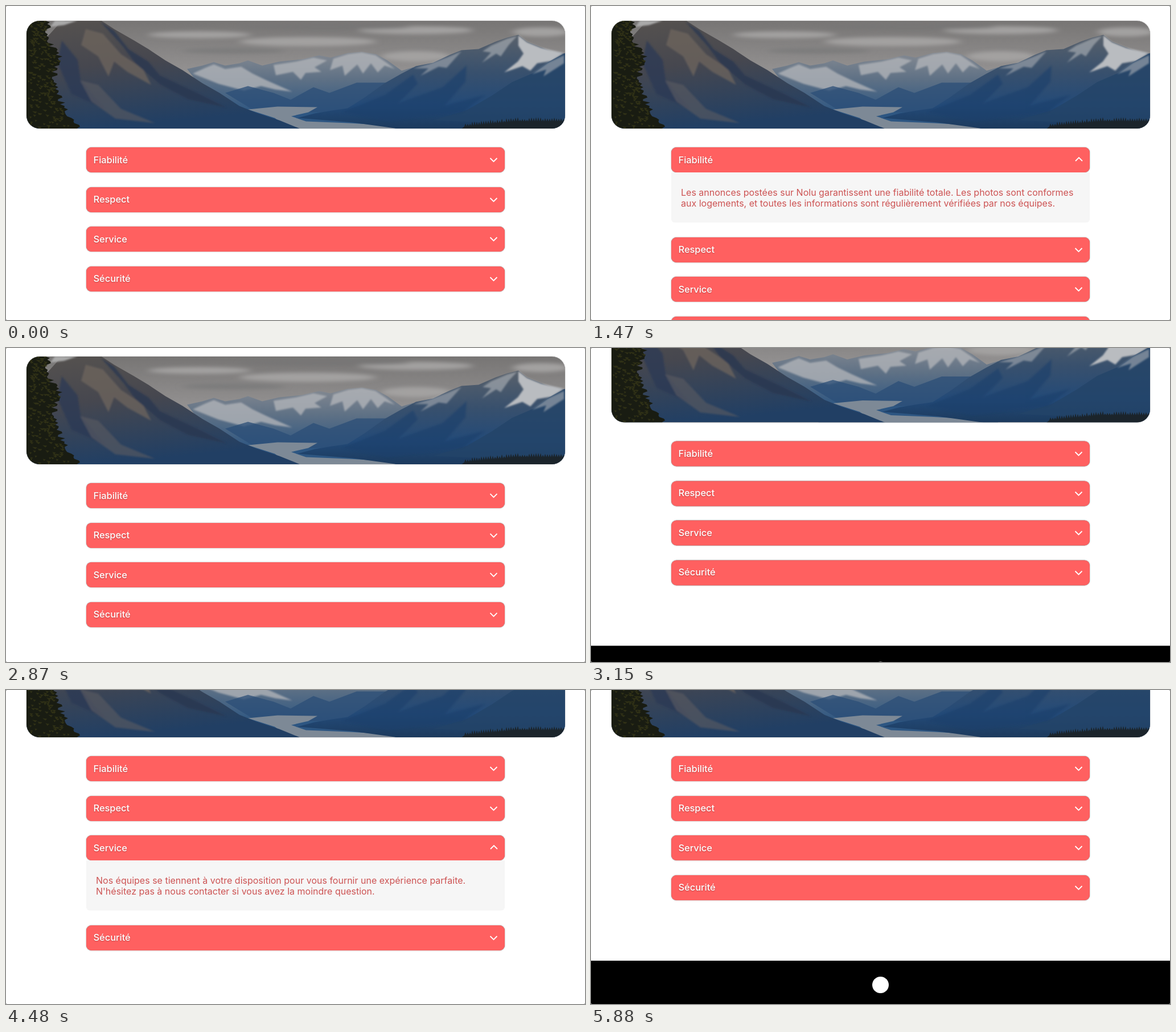
Recreate the animation shown at these times as an HTML page. Size 1017 by 551 pixels, loop 6370 ms.

```html
<!DOCTYPE html>
<html lang="fr">
<head>
<meta charset="utf-8">
<title>Accordéon</title>
<style>
html, body { margin: 0; width: 100%; height: 100%; overflow: hidden; background: #777; }
.stage { position: relative; width: 1017px; height: 551px; overflow: hidden; background: #fff; border-radius: 2px;
  font: 16px/18.7px Inter, Roboto, sans-serif; }
.page { position: absolute; inset: 0 0 auto; }
.banner { position: absolute; left: 36px; top: 25.5px; width: 945.5px; height: 189px; border-radius: 23px; overflow: hidden;
  box-shadow: 0 0 1px #000; }
.banner svg { display: block; width: 100%; height: 100%; }
.list { display: flow-root; width: 735px; padding: 248.3px 141px 80.4px; }
.item { margin-bottom: 25.5px; }
.bar { position: relative; height: 44px; border-radius: 9px; background: #ff6060; box-shadow: 0 0 1.5px rgba(0, 0, 0, .7); }
.bar span { position: absolute; left: 12.5px; top: 12.5px; color: #fff; font-size: 16.4px; font-weight: 500;
  text-shadow: 0 1px 2px rgba(0, 0, 0, .25); }
.bar svg { position: absolute; left: 708px; top: 17px; width: 15px; height: 10px; fill: none; stroke: #fff; stroke-width: 1.8; }
.open .bar svg { transform: translate(.5px, -1px) scaleY(-1); }
.panel { position: relative; height: 0; opacity: 0; background: #f6f6f6; border-radius: 0 0 6px 6px; }
.panel p { position: absolute; left: 17px; top: 25.5px; margin: 0; color: #cd5353; white-space: nowrap; }
.footer { position: relative; height: 130px; background: #000; }
.footer i { position: absolute; left: 494px; top: 28px; width: 29px; height: 29px; border-radius: 50%; background: #fff; }
</style>
</head>
<body>
<div class="stage">
  <div class="page">
    <div class="banner">
      <svg viewBox="36 25.5 945.5 189" preserveAspectRatio="none">
        <defs>
          <linearGradient id="sky" x2="0" y2="1"><stop stop-color="#777574"/><stop offset=".45" stop-color="#929090"/></linearGradient>
          <linearGradient id="left" x2=".25" y2="1"><stop stop-color="#56524f"/><stop offset=".45" stop-color="#46474f"/><stop offset="1" stop-color="#213f64"/></linearGradient>
          <linearGradient id="mid" x2="0" y2="1"><stop stop-color="#858a92"/><stop offset=".35" stop-color="#5f7185"/><stop offset=".8" stop-color="#2d5682"/></linearGradient>
          <linearGradient id="right" x2="0" y2="1"><stop stop-color="#59616b"/><stop offset=".4" stop-color="#38506d"/><stop offset=".75" stop-color="#234a78"/><stop offset="1" stop-color="#1c3a5d"/></linearGradient>
          <filter id="soft"><feGaussianBlur stdDeviation="7 3"/></filter>
          <filter id="blur"><feGaussianBlur stdDeviation="1.5"/></filter>
        </defs>
        <path fill="url(#sky)" d="M36 25h946v190H36z"/>
        <g filter="url(#soft)" fill="#a3a1a0">
          <ellipse cx="340" cy="50" rx="90" ry="6"/>
          <ellipse cx="530" cy="62" rx="120" ry="8"/>
          <ellipse cx="720" cy="42" rx="100" ry="7"/>
          <ellipse cx="720" cy="88" rx="60" ry="9"/>
          <ellipse cx="940" cy="45" rx="50" ry="8"/>
          <ellipse cx="560" cy="36" rx="150" ry="5" fill="#777676"/>
          <ellipse cx="400" cy="78" rx="90" ry="5" fill="#7c7b7c"/>
        </g>
        <path fill="url(#mid)" d="M318 110l27-6 20-6 20 6 25-4 15-5 25 9 30-7 40-4 30-7 20 4 30-8 25-2 25 4 20 11 25 18 20-6 0 108H400z"/>
        <g fill="#b0b3b8" opacity=".8" filter="url(#blur)">
          <path d="M328 118l22-10 15-6 20 8 28-4 20 12 25 12 45 20-30-4-25-6-30 8-45-12z"/>
          <path d="M470 103l40-6 30-7 24 5-22 12 12 8-28 2-8 12-14-14-30 6z"/>
          <path d="M575 92l26-8 24-3 24 5 18 12 16 12-18-6-12 12-12-16-14 18-10-16-22 20-4-18-22 8z"/>
        </g>
        <path fill="#2b4e77" opacity=".75" d="M385 152l40-12 45 12 30 12 40-22 28 10 48-18 55 0-40 52-190 0z"/>
        <path fill="#7d8996" d="M425 181l52-5 70 1-16 9-30 7 26 9 75 3 88 5-10 6H500l-28-20z"/>
        <path fill="url(#right)" d="M512 196l30-8 30-5 28-4 30-19 35-25 30-17 25-13 30-6 30-14 20-8 30-2 30-13 20-7 20-5 15 12 25 10 20 8 22 3v132H690l-80-11-60-5z"/>
        <g fill="#b9bcc0" filter="url(#blur)">
          <path d="M900 51l15 12 25 10 40 9-22 14-25 4-12 13-14-8-32 11 24-19 10-14-9-14z"/>
          <path d="M898 52l-18 5-28 12-15 10 15 2-16 18 25-16 8 5 14-20z" opacity=".55"/>
          <path d="M800 79l-24 10-32 12-28 8 26 0-14 13 32-16 14 2z" opacity=".5"/>
        </g>
        <path fill="#244468" opacity=".8" d="M982 82l-30 16-28 20-35 15-36 24-43 25-60 18 232 10z"/>
        <path fill="#a8adb4" opacity=".6" d="M980 86l-28 13-28 20 25-8-5 12 36-23z" filter="url(#blur)"/>
        <path fill="#1b3f6c" opacity=".6" d="M590 186l75-30 50-36 8 16-34 34 78-28 42-38-2 28-36 42 70-18-40 30-130 16z" filter="url(#blur)"/>
        <path fill="url(#left)" d="M36 82l38-30 20-22 12-5h61l23 15 35 20 25 15 30 20 30 17 35 23 30 17 35 23 30 12 40 13 37 15H36z"/>
        <g filter="url(#blur)">
          <path fill="#6f675f" opacity=".7" d="M140 40l30 8 32 36 38 25 15 29-42-23-23-18-10 26-18-35-30-20z"/>
          <path fill="#273650" opacity=".75" d="M166 27l24 16 25 32 35 22 20 24 68 32 50 25-68-15-48-25-45-38-22-30z"/>
          <path fill="#283a55" opacity=".7" d="M98 60l28 34 5 35 44 52-60-27-25-55z"/>
          <path fill="#5c5b61" opacity=".6" d="M130 130l32 8 40 42 60 25-70-8-42-30z"/>
          <path fill="#a9a9a9" d="M78 36l8-11h40l-24 8-16 2z"/>
        </g>
        <path id="pine" fill="#191c12"/>
        <path id="leaves" fill="#3a3a19" opacity=".7"/>
        <path id="trees" fill="#1b242b"/>
      </svg>
    </div>
    <div class="list"></div>
    <div class="footer"><i></i></div>
  </div>
</div>
<script>
const LOOP = 6370, STEP = 70, PANEL = 88, SCROLL = 132;
const sections = [
  { title: 'Fiabilité', opens: 1050, closes: 2380,
    text: 'Les annonces postées sur Nolu garantissent une fiabilité totale. Les photos sont conformes<br>aux logements, et toutes les informations sont régulièrement vérifiées par nos équipes.' },
  { title: 'Respect' },
  { title: 'Service', opens: 4060, closes: 5460,
    text: "Nos équipes se tiennent à votre disposition pour vous fournir une expérience parfaite.<br>N'hésitez pas à nous contacter si vous avez la moindre question." },
  { title: 'Sécurité' }
];
const page = document.querySelector('.page');
const list = document.querySelector('.list');

for (const s of sections) {
  s.el = document.createElement('div');
  s.el.className = 'item';
  s.el.innerHTML = `<div class="bar"><span>${s.title}</span><svg><path d="M1.5 2l6 6 6-6"/></svg></div>
    <div class="panel"><p>${s.text || ''}</p></div>`;
  s.panel = s.el.querySelector('.panel');
  list.append(s.el);
}

let seed = 7;
const random = () => (seed = seed * 16807 % 2147483647) / 2147483647;
const draw = (id, d) => document.getElementById(id).setAttribute('d', d);

// Pine on the left: rough outline with scattered lighter needles
const pineEdge = y => 74 + 18 * Math.exp(-(((y - 92) / 22) ** 2)) + 56 * ((y - 25) / 190) ** 3;
let pine = 'M36 25', leaves = '';
for (let y = 25; y < 216; y += 3) {
  const edge = pineEdge(y);
  pine += `L${edge - 6 + 12 * random()} ${y}`;
  for (let i = 0; i < 3; i++) leaves += `M${38 + (edge - 44) * random()} ${y}l${4 + 5 * random()} 1l-3 3z`;
}
draw('pine', pine + 'V215H36z');
draw('leaves', leaves);

// Treeline along the lower right edge
let trees = 'M800 215';
for (let x = 805; x < 982; x += 4) {
  const base = 211 - 9 * Math.min(1, (x - 805) / 90);
  trees += `L${x} ${base}L${x + 2} ${base - 3 - 5 * random()}`;
}
draw('trees', trees + 'L982 200V215z');

const clamp = x => Math.min(1, Math.max(0, x));
const ease = x => x * x * (3 - 2 * x);
const toggle = (t, start) => t < start ? 0 : ease(clamp((t - start + 14) / 375));

function render(t) {
  for (const s of sections) {
    if (!s.opens) continue;
    const p = toggle(t, s.opens) - toggle(t, s.closes);
    s.el.classList.toggle('open', t >= s.opens && t < s.closes);
    s.panel.style.height = p * PANEL + 'px';
    s.panel.style.opacity = p;
  }
  const y = SCROLL * ease(clamp((t - 2800) / 700) ** .75);
  page.style.transform = `translateY(${-y}px)`;
}

let start;
function tick(now) {
  start ??= now;
  // The motion advances in discrete steps
  render(Math.floor((now - start) % LOOP / STEP) * STEP);
  requestAnimationFrame(tick);
}
render(0);
requestAnimationFrame(tick);
</script>
</body>
</html>
```
